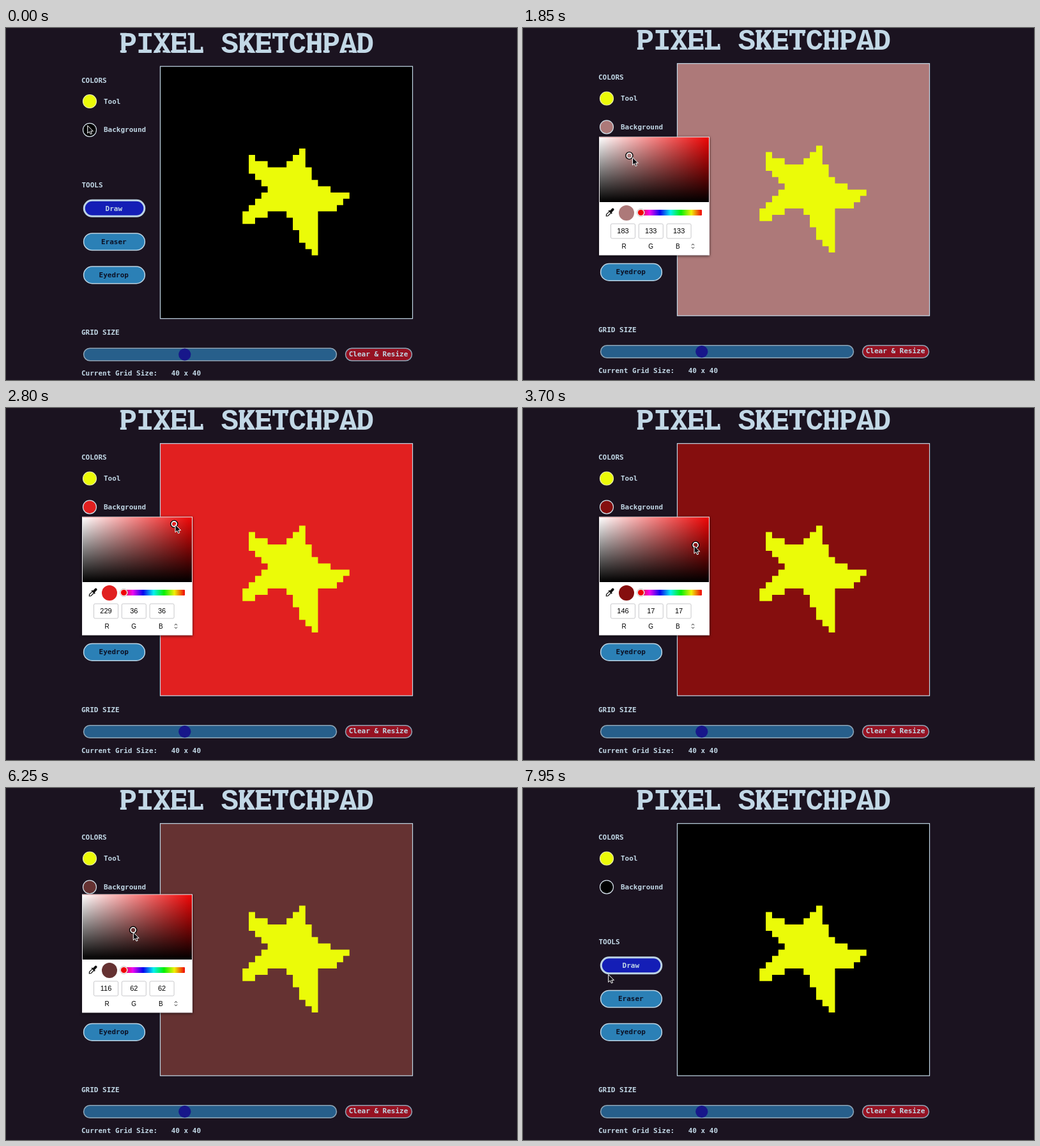
An HTML page for the animation above (8000 ms loop, 800 by 552 pixels).

```html
<!DOCTYPE html>
<html lang="en">
<head>
<meta charset="utf-8">
<title>Pixel Sketchpad</title>
<style>
  html, body { margin: 0; width: 100%; height: 100%; overflow: hidden; background: #1b1320; }
  svg { display: block; width: 800px; height: 552px; }
  text { font: bold 11px "DejaVu Sans Mono", monospace; fill: #c2d8e6; white-space: pre; }
  .title { font: bold 46px "Liberation Mono", monospace; letter-spacing: -1.11px; }
  .title, #serifs { fill: #c2d8e6; }
  .mid { text-anchor: middle; }
  .dark { fill: #0c1024; }
  .ring { stroke: #d3dfe8; stroke-width: 1.2; }
  .tool { fill: #2b80b6; stroke: #bcd4e4; stroke-width: 1.5; }
  .active { fill: #141eb6; stroke-width: 3; }
  .bar { fill: #275f8b; stroke: #8fa5b6; stroke-width: 1.5; }
  .clear { fill: #961222; }
  .yellow { fill: #ebfb08; }
  .yellow.ring { stroke: #e9f0a8; }
  #picker text { font: 11px "Liberation Sans", Arial, sans-serif; fill: #000; text-anchor: middle; }
  #picker .label { font-size: 10px; }
  .panel { fill: #fff; stroke: #f2eff4; filter: drop-shadow(0 1px 2px #000a); }
  .field { fill: #fff; stroke: #c9c9cc; }
</style>
</head>
<body>
<svg viewBox="0 0 800 552">
  <defs>
    <linearGradient id="white"><stop stop-color="#fff"/><stop offset="1" stop-color="#fff" stop-opacity="0"/></linearGradient>
    <linearGradient id="black" x2="0" y2="1"><stop stop-opacity="0"/><stop offset="1"/></linearGradient>
    <linearGradient id="hue"></linearGradient>
  </defs>

  <g id="page">
    <text class="title" x="177.5" y="34">PIXEL SKETCHPAD</text>
    <path id="serifs"/>

    <text x="118" y="81">COLORS</text>
    <circle class="ring yellow" cx="131" cy="110.5" r="10.5"/>
    <text x="153" y="114">Tool</text>
    <circle class="ring tint" cx="131" cy="155.3" r="10.5"/>
    <text x="153" y="158.7">Background</text>

    <text x="118.5" y="245">TOOLS</text>
    <rect class="tool active" x="122.3" y="265.8" width="94.5" height="25" rx="12.5"/>
    <text class="mid" x="168.8" y="282">Draw</text>
    <rect class="tool" x="121.6" y="317.4" width="95.8" height="26.6" rx="13.3"/>
    <text class="mid dark" x="168.8" y="334">Eraser</text>
    <rect class="tool" x="121.6" y="369.6" width="95.8" height="26.6" rx="13.3"/>
    <text class="mid dark" x="168.8" y="386.3">Eyedrop</text>

    <rect class="tint" x="241.5" y="55.7" width="395" height="395.5" stroke="#c2d8e6" stroke-width="1.2"/>
    <path class="yellow" transform="translate(242.2 56.5) scale(9.85)" d="M22 13H23V16H24V18H25V19H27V20H30V21H29V22H28V23H25V30H24V29H23V28H22V26H21V24H20V23H17V24H15V25H13V23H14V22H15V21H16V20H17V19H16V18H15V17H14V14H15V15H17V16H20V15H21V14H22Z"/>

    <text x="118" y="476.6">GRID SIZE</text>
    <rect class="bar" x="121.6" y="497.8" width="395.8" height="19.4" rx="9.7"/>
    <circle cx="279.8" cy="507.5" r="9.6" fill="#17178a"/>
    <rect class="bar clear" x="531.6" y="497.8" width="103.8" height="19.4" rx="9.7"/>
    <text class="mid" x="583" y="510.4">Clear &amp; Resize</text>
    <text x="118" y="540.6">Current Grid Size:</text>
    <text x="258.7" y="540.6">40 x 40</text>
  </g>

  <g id="picker">
    <rect class="panel" x="-.5" y="-.5" width="172" height="185"/>
    <rect width="171" height="101.5" fill="#ee0404"/>
    <rect width="171" height="101.5" fill="url(#white)"/>
    <rect width="171" height="101.5" fill="url(#black)"/>
    <g id="marker" fill="none">
      <circle class="tint" r="5.2" stroke="#000" stroke-width="2"/>
      <circle r="4" stroke="#fff" stroke-width="1.6"/>
    </g>
    <g transform="translate(15.3 118.5) rotate(45)" fill="#111">
      <path d="M-2-7.5a2 2 0 0 1 4 0V-3H3.5V-1H-3.5V-3H-2Z"/>
      <path d="M-1.7-1V5L0 7 1.7 5V-1" fill="none" stroke="#111" stroke-width="1.2"/>
    </g>
    <circle class="tint" cx="42" cy="118.5" r="12"/>
    <rect x="62" y="113.5" width="98" height="9" rx="1" fill="url(#hue)"/>
    <circle cx="64.5" cy="118" r="6" fill="#fff" stroke="#999" stroke-width=".6"/>
    <circle cx="64.5" cy="118" r="4.6" fill="#ee0404"/>
    <g id="channels"></g>
    <path d="M144 169.3l2-2.2 2 2.2M144 172l2 2.2 2-2.2" fill="none" stroke="#222"/>
  </g>

  <path id="cursor" d="M0 0V12L2.8 9.5 4.7 13.6 6.8 12.7 5 8.8H8.8Z" fill="#101014" stroke="#fff" stroke-linejoin="round"/>
</svg>
<script>
const LOOP = 8000, STEP = 50, LAG = 100;
const FIELD_W = 170, FIELD_H = 101.5;
const $ = id => document.getElementById(id);
const clamp = (v, lo, hi) => Math.min(hi, Math.max(lo, v));

// Slab serifs on the title: each part is x, y, width, height inside a letter cell
const slab = {
  topLeft: [1.3, 3.3, 10, 3.4], topRight: [15, 3.3, 10, 3.4],
  footLeft: [1.3, 30.6, 10, 3.4], footRight: [15, 30.6, 10, 3.4], footMid: [7.5, 30.6, 12, 3.4],
  dropLeft: [1.3, 3.3, 3.4, 9], dropRight: [21.5, 3.3, 3.4, 9], riseRight: [21.5, 25, 3.4, 9]
};
const { topLeft, topRight, footLeft, footRight, footMid, dropLeft, dropRight, riseRight } = slab;
const left = [topLeft, footLeft], corners = [...left, topRight, footRight];
const serifs = {
  P: left, D: left, X: corners, K: corners, H: corners, A: [footLeft, footRight],
  E: [...left, dropRight, riseRight], L: [...left, riseRight], T: [dropLeft, dropRight, footMid]
};
$('serifs').setAttribute('d', [...'PIXEL SKETCHPAD'].flatMap((letter, i) =>
  (serifs[letter] || []).map(([x, y, w, h]) =>
    `M${177.5 + i * 26.49 + x} ${y}h${w}v${h}h${-w}z`)).join(''));

$('hue').innerHTML = Array.from({ length: 7 }, (_, i) =>
  `<stop offset="${i / 6}" stop-color="hsl(${360 - i * 60} 96% 48%)"/>`).join('');

$('channels').innerHTML = [...'RGB'].map((name, i) => {
  const x = 17.5 + i * 43.8;
  return `<rect class="field" x="${x}" y="135.5" width="38" height="23" rx="2"/>
    <text class="value" x="${x + 19}" y="150.7">0</text>
    <text class="label" x="${38 + i * 42.2}" y="174">${name}</text>`;
}).join('');

const tints = document.querySelectorAll('.tint');
const values = document.querySelectorAll('.value');

// Pointer path: time, x, y
const path = [
  [0, 127.7, 153], [250, 127.7, 153], [950, 150, 235], [1750, 166.44, 200.16], [1850, 171.5, 203],
  [2700, 263.27, 181.85], [2800, 265, 183], [3600, 270.2, 214.9], [3700, 268, 216.3],
  [4250, 240.7, 221.6], [4600, 240.7, 221.6], [5000, 127, 156], [5600, 127, 156],
  [6050, 212, 221], [6150, 199.1, 222.8], [6250, 199.3, 226.5], [6900, 180, 240],
  [7350, 145, 270], [7750, 133.7, 292.5], [LOOP, 133.7, 292.5]
];

function pointer(t) {
  const i = path.findIndex(p => p[0] > t);
  const [t0, x0, y0] = path[i - 1], [t1, x1, y1] = path[i];
  const k = (t - t0) / (t1 - t0);
  return [x0 + (x1 - x0) * k, y0 + (y1 - y0) * k];
}

// The marker trails the pointer while dragging and rests in between
function markerAt(t) {
  if (t < 950) return [120, 273];
  return pointer(t < 6050 ? clamp(t - LAG, 950, 4250) : Math.max(t - LAG, 6050));
}

// Screen colours come out slightly darker and less saturated than the picked values
const shade = v => 255 * (v / 255) ** 1.17;
function screenColor(red, rest) {
  const r = shade(red), g = shade(rest) + 0.03 * (r - shade(rest));
  return `rgb(${Math.round(r)},${Math.round(g)},${Math.round(g)})`;
}
const move = (el, x, y) => el.setAttribute('transform', `translate(${x} ${y})`);

function draw(t) {
  const reopened = t >= 5600;
  const open = (t >= 200 && t < 5100) || (reopened && t < 7850);
  const top = reopened ? 167.5 : 171.5;
  const markTop = t < 6050 ? 171.5 : 167.5;

  const [mx, my] = markerAt(t);
  const s = clamp((mx - 120) / FIELD_W, 0, 1);
  const v = 1 - clamp((my - markTop) / FIELD_H, 0, 1);
  const red = Math.round(255 * v), rest = Math.round(255 * v * (1 - s));
  const color = screenColor(red, rest);

  tints.forEach(el => el.style.fill = color);
  values.forEach((el, i) => el.textContent = i ? rest : red);
  move($('page'), 0, t < 500 ? 4.5 : 0);
  move($('picker'), 120, top);
  move($('marker'), s * FIELD_W, (1 - v) * FIELD_H);
  move($('cursor'), ...pointer(t));
  $('picker').style.display = open ? '' : 'none';
}

const start = performance.now();
function frame() {
  const t = (performance.now() - start) % LOOP;
  draw(Math.floor(t / STEP) * STEP);
  requestAnimationFrame(frame);
}
frame();
</script>
</body>
</html>
```
